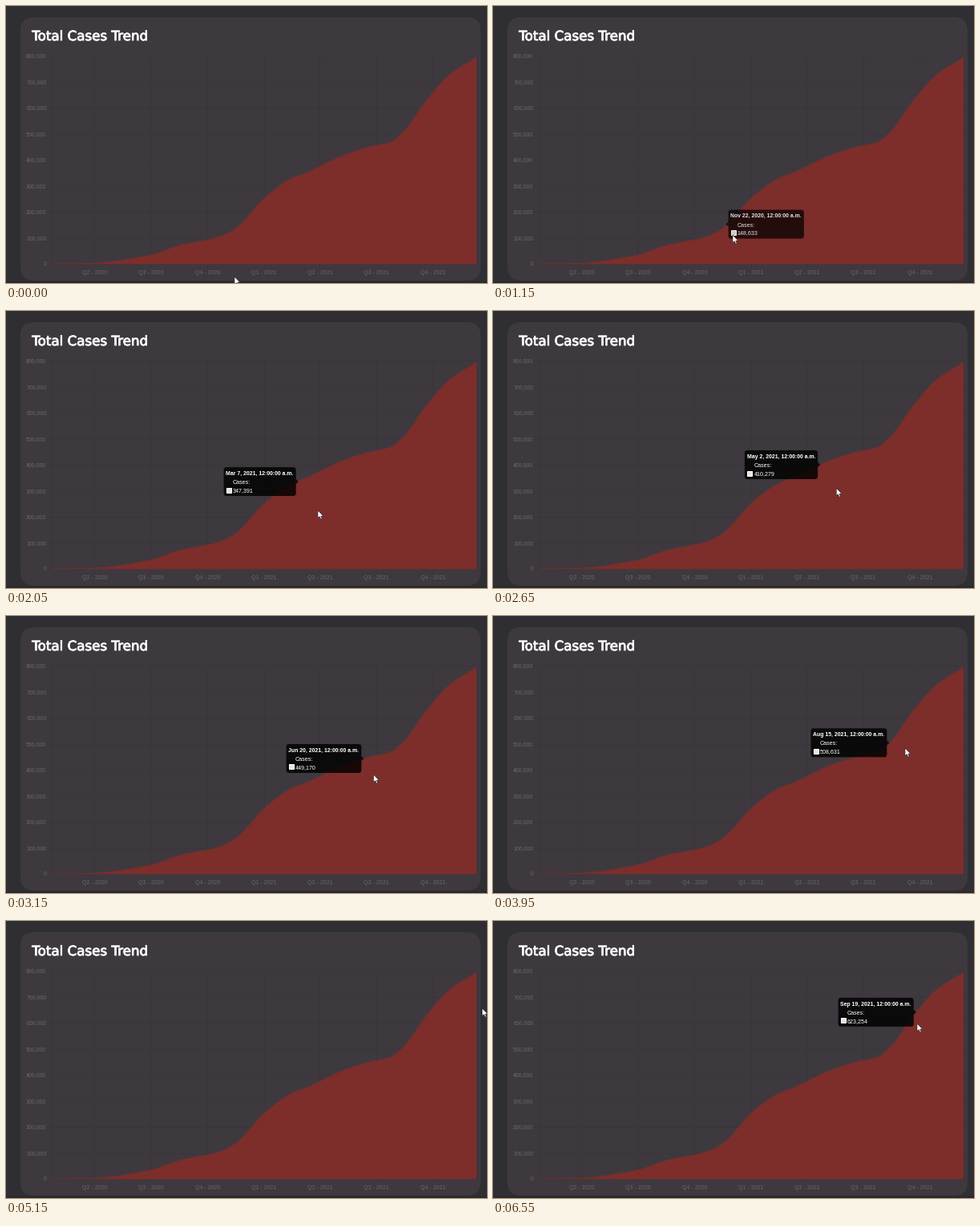
A matplotlib script for the animation above (6.6 s loop, 600 by 346 pixels).

```python
import numpy as np
import matplotlib.pyplot as plt
import matplotlib.dates as mdates
import matplotlib.patheffects as pe
from matplotlib.animation import FuncAnimation
from matplotlib.patches import FancyBboxPatch, Polygon, Rectangle

W, H, DPI = 600, 346, 100
STEP, FRAMES = 50, 132
PT = 72 / DPI  # points per pixel
LEFT, RIGHT, TOP, BASE = 56.5, 586.5, 62, 322
DAY_PX = 0.77
START = np.datetime64("2020-01-22")

PAGE, STRIP, PANEL = "#2e2e33", "#29292d", "#3d393f"
GRID, TICK, AREA = "#353238", "#69666c", "#8e2c26"


def smooth(x, xs, ys):
    """Monotone cubic interpolation, held at both ends."""
    x = np.clip(x, xs[0], xs[-1])
    h = np.diff(xs)
    d = np.diff(ys) / h
    m = np.r_[d[0], np.zeros(len(d) - 1), d[-1]]
    same = d[:-1] * d[1:] > 0
    a, b = d[:-1][same], d[1:][same]
    m[1:-1][same] = 2 * a * b / (a + b)
    i = np.clip(np.searchsorted(xs, x, side="right") - 1, 0, len(h) - 1)
    t = (x - xs[i]) / h[i]
    return ((1 + 2 * t) * (1 - t) ** 2 * ys[i] + t * (1 - t) ** 2 * h[i] * m[i]
            + t * t * (3 - 2 * t) * ys[i + 1] + t * t * (t - 1) * h[i] * m[i + 1])


def day_x(day):
    return LEFT + DAY_PX * day


def case_y(cases):
    return BASE - cases * (BASE - TOP) / 800_000


# bends of the curve: day, thousands of cases
bends = np.array([
    (0, 0), (60, 1.5), (161, 34), (206, 70), (271, 103), (298, 135.365),
    (348, 259), (391, 331), (410, 347.391), (473, 417), (515, 449.17),
    (548, 466), (571, 508.631), (606, 623.254), (645, 727), (690, 795)])
days = np.r_[0, np.arange(4, 691, 7)]
cases = np.rint(1000 * smooth(days, *bends.T)).astype(int)
xs = np.minimum(day_x(days), RIGHT)
ys = case_y(cases)

# pointer stops: ms, x, y
stops = np.array([
    (700, 285, 338), (1150, 299, 286), (2050, 389, 249), (3150, 458.5, 198),
    (3950, 514, 165), (5150, 594, 109), (5950, 594, 109), (6550, 529, 128)])


def pointer(ms):
    t, x, y = stops.T
    return np.array([smooth(ms, t, x), smooth(ms, t, y)])


def simulate(follow=0.4, lag=20):
    """Tooltip chases the data point nearest to the pointer."""
    pos, side, alpha, k = np.array([533.0, 109.0]), 1.0, 0.0, 0
    states = []
    for f in range(FRAMES):
        mx, my = pointer(f * STEP - lag)
        if LEFT <= mx <= RIGHT and TOP <= my <= BASE:
            k = int(np.argmin((xs - mx) ** 2 + (ys - my) ** 2))
            pos = pos + follow * (np.array([xs[k], ys[k]]) - pos)
            side += follow * ((xs[k] > (LEFT + RIGHT) / 2) - side)
            alpha = min(1, alpha + 0.125)
        else:
            alpha = max(0, alpha - 0.35)
        states.append((*pos, side, alpha, k))
    return states


states = simulate()

fig = plt.figure(figsize=(W / DPI, H / DPI), dpi=DPI, facecolor=PAGE)
ax = fig.add_axes([0, 0, 1, 1])
ax.set(xlim=(0, W), ylim=(H, 0))
ax.axis("off")


def label(x, y, s, size=7, color="white", **kw):
    kw.setdefault("family", "Liberation Sans")
    return ax.text(x, y, s, size=size * PT, color=color, va="baseline", **kw)


def rounded(x, y, w, h, r, color, **kw):
    style = f"round,pad=0,rounding_size={r}"
    return ax.add_patch(FancyBboxPatch((x, y), w, h, boxstyle=style, fc=color, lw=0, **kw))


def grid(x, y):
    ax.plot(x, y, color=GRID, lw=0.8 * PT, alpha=0.55, zorder=1.1)


# card
ax.add_patch(Rectangle((0, 344), W, 2, fc=STRIP, lw=0))
rounded(18, 14, 574, 329, 17, PANEL)
label(32.3, 43, "Total Cases Trend", 16.7, family="DejaVu Sans",
      path_effects=[pe.withStroke(linewidth=0.8 * PT, foreground="white")])

# chart
for v in range(0, 800_001, 100_000):
    y = case_y(v)
    grid((51, RIGHT), (y, y))
    label(50.4, y + 2.5, f"{v:,}", color=TICK, ha="right")
for x in (LEFT, RIGHT):
    grid((x, x), (TOP, BASE))
for month in np.arange("2020-04", "2022-01", 3, dtype="datetime64[M]"):
    x = day_x((month.astype("datetime64[D]") - START).astype(int))
    grid((x, x), (TOP, BASE + 5))
    year, q = divmod(month.astype(int) // 3, 4)
    label(x, 335, f"Q{q + 1} - {1970 + year}", color=TICK, ha="center")
ax.fill_between(xs, ys, BASE, color=AREA, alpha=0.8, lw=0, zorder=1.2)
ax.plot(xs, ys, color=AREA, alpha=0.8, lw=0.8 * PT, zorder=1.3)

# tooltip
TIP_H, PAD, GAP = 36, 2.8, 3
box = rounded(0, 0, 95, TIP_H, 3.5, "black", zorder=4)
caret = ax.add_patch(Polygon(np.zeros((3, 2)), fc="black", lw=0, zorder=4))
title = label(0, 0, "", 6.9, weight="bold", zorder=5)
series = label(0, 0, "Cases:", 7.1, zorder=5)
value = label(0, 0, "", 7.1, zorder=5)
swatch = ax.add_patch(Rectangle((0, 0), 6, 6, fc="#f3dfdc", ec="white", lw=1 * PT, zorder=5))
tip = (box, caret, title, series, value, swatch)

ARROW = np.array([(0, 0), (0, 9.6), (2.2, 7.7), (3.8, 11.2), (5.3, 10.5),
                  (3.8, 7.2), (6.7, 7)])
cursor = ax.add_patch(Polygon(ARROW, fc="white", ec="#222226", lw=0.6 * PT, zorder=6))


def date_text(day):
    d = mdates.num2date(mdates.date2num(START) + day)
    return f"{d:%b} {d.day}, {d.year}, 12:00:00 a.m."


def draw_tip(px, py, side, alpha, k):
    for part in tip:
        part.set_visible(alpha > 0)
        part.set_alpha(alpha)
    if alpha == 0:
        return
    box.set_alpha(0.82 * alpha)
    caret.set_alpha(0.82 * alpha)
    title.set_text(date_text(days[k]))
    value.set_text(f"{cases[k]:,}")
    w = title.get_window_extent(fig.canvas.get_renderer()).width + 2 * PAD
    x, y = px + GAP - side * (w + 2 * GAP), py - TIP_H / 2
    box.set_bounds(x, y, w, TIP_H)
    edge, point = (x + w, 3) if side > 0.5 else (x, -3)
    caret.set_xy([(edge, py - 3), (edge + point, py), (edge, py + 3)])
    title.set_position((x + PAD, y + 9.7))
    series.set_position((x + 11.4, y + 21))
    value.set_position((x + 11.4, y + 30.8))
    swatch.set_xy((x + PAD + 0.7, y + 25.5))


def update(f):
    draw_tip(*states[f])
    cursor.set_xy(ARROW + pointer(f * STEP))
    return (*tip, cursor)


anim = FuncAnimation(fig, update, frames=FRAMES, interval=STEP, repeat=True,
                     repeat_delay=0, blit=False)
plt.show()
```
